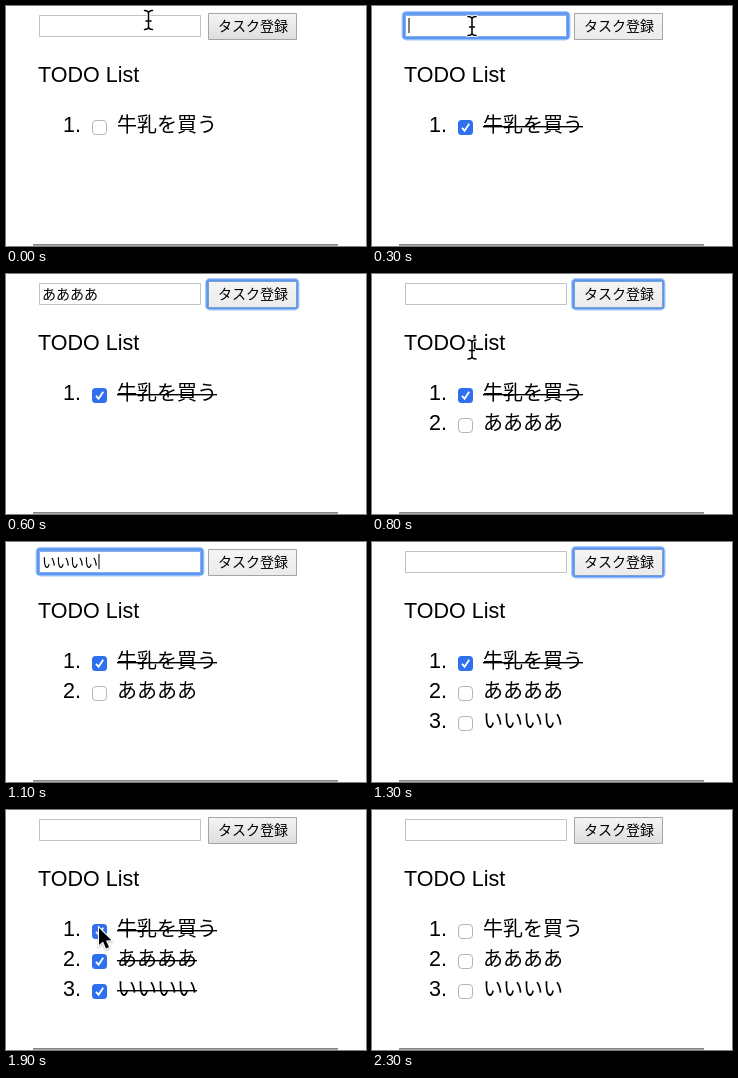
Recreate the animation shown at these times as an HTML page with a canvas. Size 360 by 240 pixels, loop 2.4 s.

```html
<!DOCTYPE html>
<html lang="ja">
<head>
<meta charset="utf-8">
<title>TODO List</title>
<style>
html, body { margin: 0; width: 100%; height: 100%; overflow: hidden; background: #fff; }
canvas { display: block; width: 360px; height: 240px; }
</style>
</head>
<body>
<canvas id="stage"></canvas>
<script>
const LOOP = 2400, STEP = 100;
const JP = '"Noto Sans CJK JP", "Noto Sans CJK", sans-serif';
const LATIN = '"Liberation Sans", Arial, sans-serif';
const ITEMS = ['牛乳を買う', 'ああああ', 'いいいい'];

const canvas = document.getElementById('stage');
const c = canvas.getContext('2d');
const ratio = window.devicePixelRatio || 1;
canvas.width = 360 * ratio;
canvas.height = 240 * ratio;

// Each entry changes the state from its time on.
const TIMELINE = [
  [0, { count: 1, done: [0, 0, 0], text: '', focus: '', popup: false, shade: true, beam: [142.5, 14], arrow: null }],
  [100, { beam: null, arrow: [95, 117] }],
  [200, { done: [1, 0, 0] }],
  [300, { focus: 'input', shade: false, arrow: null, beam: [100, 20] }],
  [400, { text: 'ああ', beam: null }],
  [500, { text: 'ああああ', popup: true }],
  [600, { popup: false, focus: 'button' }],
  [700, { text: '', count: 2 }],
  [800, { beam: [100, 75.5] }],
  [900, { focus: 'input', beam: [100, 20] }],
  [1000, { text: 'いい', beam: null }],
  [1100, { text: 'いいいい' }],
  [1200, { focus: 'button' }],
  [1300, { text: '', count: 3 }],
  [1400, { focus: '', shade: true, done: [1, 1, 0], arrow: [97, 146] }],
  [1500, { arrow: [98, 172] }],
  [1600, { done: [1, 1, 1], arrow: [97, 176] }],
  [1700, { arrow: [96, 157] }],
  [1800, { arrow: [94, 132] }],
  [1900, { arrow: [93, 118] }],
  [2000, { done: [0, 1, 1] }],
  [2100, { done: [0, 0, 1], arrow: [94, 149] }],
  [2200, { done: [0, 0, 0], arrow: [95, 182] }],
  [2300, { arrow: null }]
];

function stateAt(time) {
  const s = {};
  for (const [start, change] of TIMELINE) if (start <= time) Object.assign(s, change);
  return s;
}

function label(text, x, y, size, family = JP) {
  c.font = size + 'px ' + family;
  c.fillStyle = '#000';
  c.fillText(text, x, y);
}

function box(x, y, w, h, r, fill, line, width = 1) {
  c.beginPath();
  c.roundRect(x, y, w, h, r);
  if (fill) { c.fillStyle = fill; c.fill(); }
  if (line) { c.strokeStyle = line; c.lineWidth = width; c.stroke(); }
}

function shadow(color, blur, dy) {
  c.shadowColor = color;
  c.shadowBlur = blur * ratio;
  c.shadowOffsetY = dy * ratio;
}

function poly(points, close) {
  c.beginPath();
  points.forEach(([x, y]) => c.lineTo(x, y));
  if (close) c.closePath();
}

function ring(x, y, w, h) {
  box(x, y, w, h, 3, null, '#a9c8fb', 4);
  box(x + .5, y + .5, w - 1, h - 1, 2, null, '#5a96f3', 2.5);
}

function drawInput(s) {
  if (s.focus === 'input') ring(31.5, 7, 165, 25.5);
  box(33.5, 9.5, 161, 21, 0, '#fff', s.focus === 'input' ? '#84aeea' : '#c3c3c3');
  label(s.text, 36, 25, 14);
  if (s.focus === 'input') {
    c.fillRect(36.5 + c.measureText(s.text).width, 12, 1, 15);
  }
}

function drawButton(s) {
  if (s.focus === 'button') ring(201, 6, 90.5, 28.5);
  const g = c.createLinearGradient(0, 7, 0, 33);
  g.addColorStop(0, '#f5f5f5');
  g.addColorStop(1, s.shade ? '#dedede' : '#ebebeb');
  box(202.5, 7.5, 88, 26, 0, g, s.focus === 'button' ? '#7d9fd0' : '#a4a4a4');
  label('タスク登録', 212, 25, 14);
}

function drawCheck(y, on) {
  if (!on) {
    box(86.5, y - 7, 14, 14, 3.5, '#fff', '#b5b5b5');
    return;
  }
  box(86, y - 7.5, 15, 15, 3.5, '#2f70ee');
  poly([[90, y + .3], [92.6, y + 3.2], [97.2, y - 3.7]]);
  c.strokeStyle = '#fff';
  c.lineWidth = 1.8;
  c.stroke();
}

function drawItem(i, done) {
  const y = 126 + i * 30;
  label(i + 1 + '.', 57, y, 21.5, LATIN);
  drawCheck(y - 4.5, done);
  label(ITEMS[i], 111, y, 20);
  if (done) c.fillRect(111, y - 6, c.measureText(ITEMS[i]).width, 1.4);
}

function drawPopup() {
  c.save();
  shadow('rgba(0,0,0,.32)', 22, 8);
  box(31, 28, 192, 93, 0, '#fff');
  c.restore();
  c.fillStyle = '#f6f6f6';
  c.fillRect(31, 98, 192, 23);
  box(31.5, 28.5, 191, 92, 0, null, '#a8a8a8');
  [4, 7, 11].forEach((n, i) => label('あ'.repeat(n), 36, 48 + i * 22, 16));
  c.fillStyle = '#8c2630';
  c.fillRect(32, 96.5, 190, 1.3);
  label('Tabキーで選択', 37, 116, 16);
}

function drawBeam([x, y]) {
  c.save();
  c.translate(x, y);
  c.lineCap = 'round';
  for (const [color, width] of [['#fff', 3.6], ['#000', 1.5]]) {
    c.strokeStyle = color;
    c.lineWidth = width;
    c.beginPath();
    for (const d of [-1, 1]) {
      c.moveTo(-4, 9.5 * d);
      c.quadraticCurveTo(0, 9.5 * d, 0, 6.5 * d);
      c.quadraticCurveTo(0, 9.5 * d, 4, 9.5 * d);
    }
    c.moveTo(0, -7);
    c.lineTo(0, 7);
    c.moveTo(-2.5, 1);
    c.lineTo(2.5, 1);
    c.stroke();
  }
  c.restore();
}

function drawArrow([x, y]) {
  c.save();
  c.translate(x, y);
  poly([[0, 0], [0, 17], [4, 13.4], [7, 20.5], [10, 19.2], [7.1, 12.4], [12.3, 12.2]], true);
  shadow('rgba(0,0,0,.3)', 2, 1);
  c.strokeStyle = '#fff';
  c.lineWidth = 2.2;
  c.stroke();
  c.shadowColor = 'transparent';
  c.fillStyle = '#000';
  c.fill();
  c.restore();
}

function draw(time) {
  const s = stateAt(time);
  c.setTransform(ratio, 0, 0, ratio, 0, 0);
  c.fillStyle = '#fff';
  c.fillRect(0, 0, 360, 240);
  drawInput(s);
  drawButton(s);
  label('TODO List', 32, 76, 21.5, LATIN);
  for (let i = 0; i < s.count; i++) drawItem(i, s.done[i]);
  c.fillStyle = '#555';
  c.fillRect(27, 238.3, 305, 1.2);
  if (s.popup) drawPopup();
  if (s.beam) drawBeam(s.beam);
  if (s.arrow) drawArrow(s.arrow);
}

const begin = performance.now();
function tick() {
  const time = (performance.now() - begin) % LOOP;
  draw(Math.floor(time / STEP) * STEP);
  requestAnimationFrame(tick);
}
tick();
</script>
</body>
</html>
```
